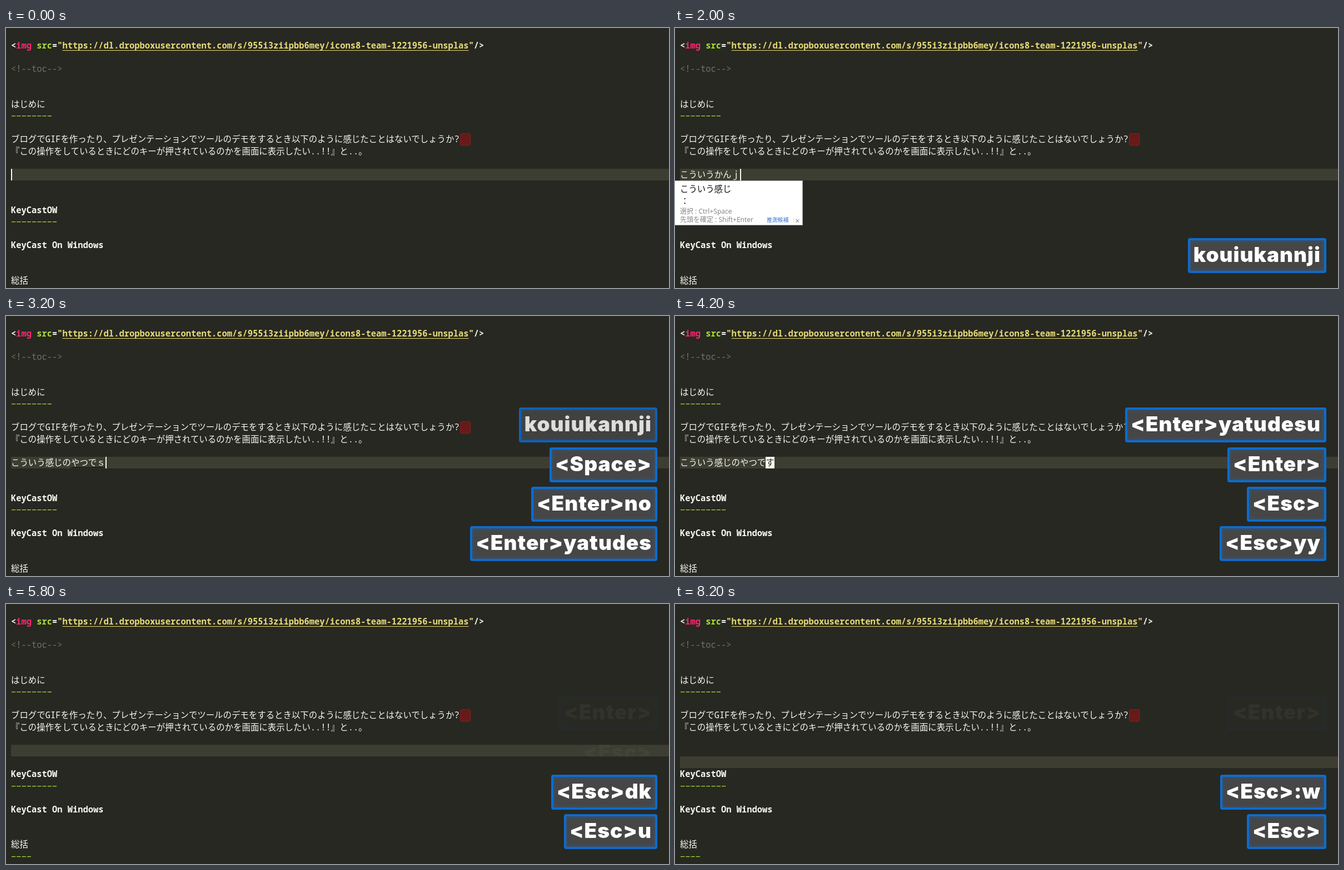
These frames come from a looping animation (1193x469 px, 8.6 s). An HTML page:

```html
<!DOCTYPE html>
<html lang="ja">
<head>
<meta charset="utf-8">
<style>
html, body { margin: 0; width: 100%; height: 100%; overflow: hidden; background: #272822; }
body { position: relative; color: #f8f8f2; font: 500 15.43px "Noto Sans Mono", "Noto Sans CJK JP", monospace; }
.line, .bar, .cursor, .red, .key, #popup, #popup div { position: absolute; white-space: pre; }
.line, .bar, .cursor { left: 9px; height: 21.2px; line-height: 21.2px; }
.bar { right: 0; background: #3e3d32; }
.cursor { background: #f8f8f0; color: #272822; }
.tag { color: #f92672; }
.green { color: #a6e22e; }
.string { color: #e6db74; }
.note { color: #75715e; font-weight: 400; }
.strong { font-weight: 600; }
u { text-underline-offset: 3px; text-decoration-thickness: 1px; text-decoration-skip-ink: none; }
.compose { text-decoration-color: #000; }
.red { left: 817px; top: 190px; width: 17px; height: 20px; border: 1px solid #7f2320; border-radius: 3px; background: #671a17; }
#popup { left: -1px; top: 275px; width: 229px; height: 79px; background: #fff; border: 1px solid #a5a5a5;
  color: #111; font: 15.4px "Noto Sans CJK JP", sans-serif; }
#popup div { line-height: 20px; }
#popup .hint { color: #888; font: 12px/16px "Noto Sans", "Noto Sans CJK JP", sans-serif; }
.key { right: 21px; height: 55px; padding: 0 6px; border: 4px solid #0c6cd0; border-radius: 4px;
  background: #464646; box-shadow: inset 0 0 4px 3px #3d4e5f; color: #fff;
  font: 900 37px/52px Inter, sans-serif; letter-spacing: 1px; }
.band { clip-path: inset(17px 0 25px); }
</style>
</head>
<body>
<div id="editor"></div>
<div id="popup">
  <div style="left:9px;top:3px">こういう感じ</div>
  <div style="left:10px;top:25px">：</div>
  <div class="hint" style="left:9px;top:47px">選択 : Ctrl+Space</div>
  <div class="hint" style="left:9px;top:62px">先頭を確定 : Shift+Enter</div>
  <div class="hint" style="left:165px;top:63px;font-size:9.8px;color:#2f6fd0">推測候補</div>
  <div class="hint" style="left:211px;top:62px;font-size:9px;color:#ccc">|</div>
  <div class="hint" style="left:216px;top:63px;font-size:15px">×</div>
</div>
<div id="keys"></div>
<script>
const LOOP = 8600, STEP = 200, EM = 15.43, EDIT_ROW = 11;
const $ = id => document.getElementById(id);
const esc = s => s.replace(/&/g, '&amp;').replace(/</g, '&lt;');
const span = (cls, s) => `<span class="${cls}">${esc(s)}</span>`;
const rowTop = row => 21 + 21.18 * row;
const block = (cls, row, html, style = '') =>
  `<div class="${cls}" style="top:${rowTop(row)}px;${style}">${html}</div>`;
const rule = n => span('green', '\u2212'.repeat(n));

const url = 'https://dl.dropboxusercontent.com/s/955i3ziipbb6mey/icons8-team-1221956-unsplas';
const head = [
  [0, '<span class="strong">&lt;' + span('tag', 'img') + ' ' + span('green', 'src') + '=' +
    `<span class="string">"<u>${url}</u>"</span>/&gt;</span>`],
  [2, span('note', '<!--toc-->')],
  [5, 'はじめに'],
  [6, rule(8)],
  [8, 'ブログでGIFを作ったり、プレゼンテーションでツールのデモをするとき以下のように感じたことはないでしょうか?'],
  [9, '『この操作をしているときにどのキーが押されているのかを画面に表示したい..!!』と..。']
];
const tail = [
  [14, span('strong', 'KeyCastOW')],
  [15, rule(9)],
  [17, span('strong', 'KeyCast On Windows')],
  [20, '総括'],
  [21, rule(4)]
];

// time, edited text, extra lines, cursor row offset, start of the underlined part
const done = 'こういう感じのやつです';
const edits = [
  [0, ''],
  [600, 'ｋ'],
  [800, 'こう'],
  [1000, 'こうい'],
  [1200, 'こういう'],
  [1400, 'こういうｋ'],
  [1600, 'こういうかｎ'],
  [1800, 'こういうかん'],
  [2000, 'こういうかんｊ'],
  [2200, 'こういう感じ', 0, 0, 0],
  [2400, 'こういう感じ'],
  [2600, 'こういう感じの'],
  [2800, 'こういう感じのや', 0, 0, 7],
  [3000, 'こういう感じのやつ', 0, 0, 7],
  [3200, 'こういう感じのやつでｓ', 0, 0, 7],
  [3400, done, 0, 0, 7],
  [3600, done],
  [3800, done],
  [4400, done, 1, 1],
  [5200, '', -1, 0],
  [6000, done, 1, 1],
  [6800, '', -1, 1]
];

// start, keys per step, end, ghost opacity, ghost end, ghost class
const casts = [
  [600, 'ko|u|i|u|ka|n|n|ji'],
  [2200, '<Space>'],
  [2400, '<Enter>|no'],
  [2800, '<Enter>ya|tu|des|u'],
  [3600, '<Enter>', 5200, .045, LOOP],
  [3800, '<Esc>', 5400, .03, 6000, 'band'],
  [4000, '<Esc>y|y|p', 5800],
  [4800, '<Esc>d|k', 6600, .14, 7400],
  [5600, '<Esc>u'],
  [6800, '<Ctrl - r>', 8200],
  [7400, '<Esc>|:|w'],
  [8000, '<Esc>']
];

function drawEditor(t) {
  const [since, text, extra = 0, offset = 0, mark = text.length] = edits.filter(e => e[0] <= t).pop();
  const row = EDIT_ROW + offset;
  const at = ([r, html]) => block('line', r, html);
  let html = block('bar', row, '') + head.map(at).join('') + '<div class="red"></div>';
  const line = text.slice(0, mark) + `<u class="compose">${text.slice(mark)}</u>`;
  for (let i = 0; i <= extra; i++) html += block('line', EDIT_ROW + i, line);
  html += tail.map(([r, s]) => at([r + extra, s])).join('');

  if (t < 3800) {
    html += block('cursor', row, '', `left:${9 + EM * text.length}px;width:2px`);
  } else if ((t - since) % 800 < 600) { // blink restarts with each edit
    const col = t < 4400 ? text.length - 1 : 0, char = text[col] || '';
    html += block('cursor', row, char, `left:${9 + EM * col}px;width:${char ? EM : 9.2}px`);
  }
  $('editor').innerHTML = html;
  $('popup').style.display = t >= 1000 && t < 2200 ? '' : 'none';
}

function drawKeys(t) {
  $('keys').innerHTML = casts.map(([start, keys, end, ghost, ghostEnd = 0, cls = ''], i) => {
    const parts = keys.split('|');
    const last = start + (parts.length - 1) * STEP;
    end = end || last + 1600;
    const faded = t >= end;
    if (t < start || faded && t >= ghostEnd) return '';
    const label = parts.slice(0, (t - start) / STEP + 1).join('');
    const slot = casts.filter((c, j) => j > i && c[0] <= Math.min(t, end)).length;
    const opacity = faded ? ghost : Math.min(1, 1 - (t - last - 1000) / 1300);
    return `<div class="key ${faded ? cls : ''}" style="top:${379 - 71.2 * slot}px;opacity:${opacity}">${esc(label)}</div>`;
  }).join('');
}

let shown = -1;
const began = performance.now();
function frame() {
  let t = Math.floor((performance.now() - began) % LOOP / STEP) * STEP;
  if (t === 5400) t = 5200; // pause
  if (t === 8400) t = 8200;
  if (t !== shown) {
    shown = t;
    drawEditor(t);
    drawKeys(t);
  }
  requestAnimationFrame(frame);
}
frame();
</script>
</body>
</html>
```
